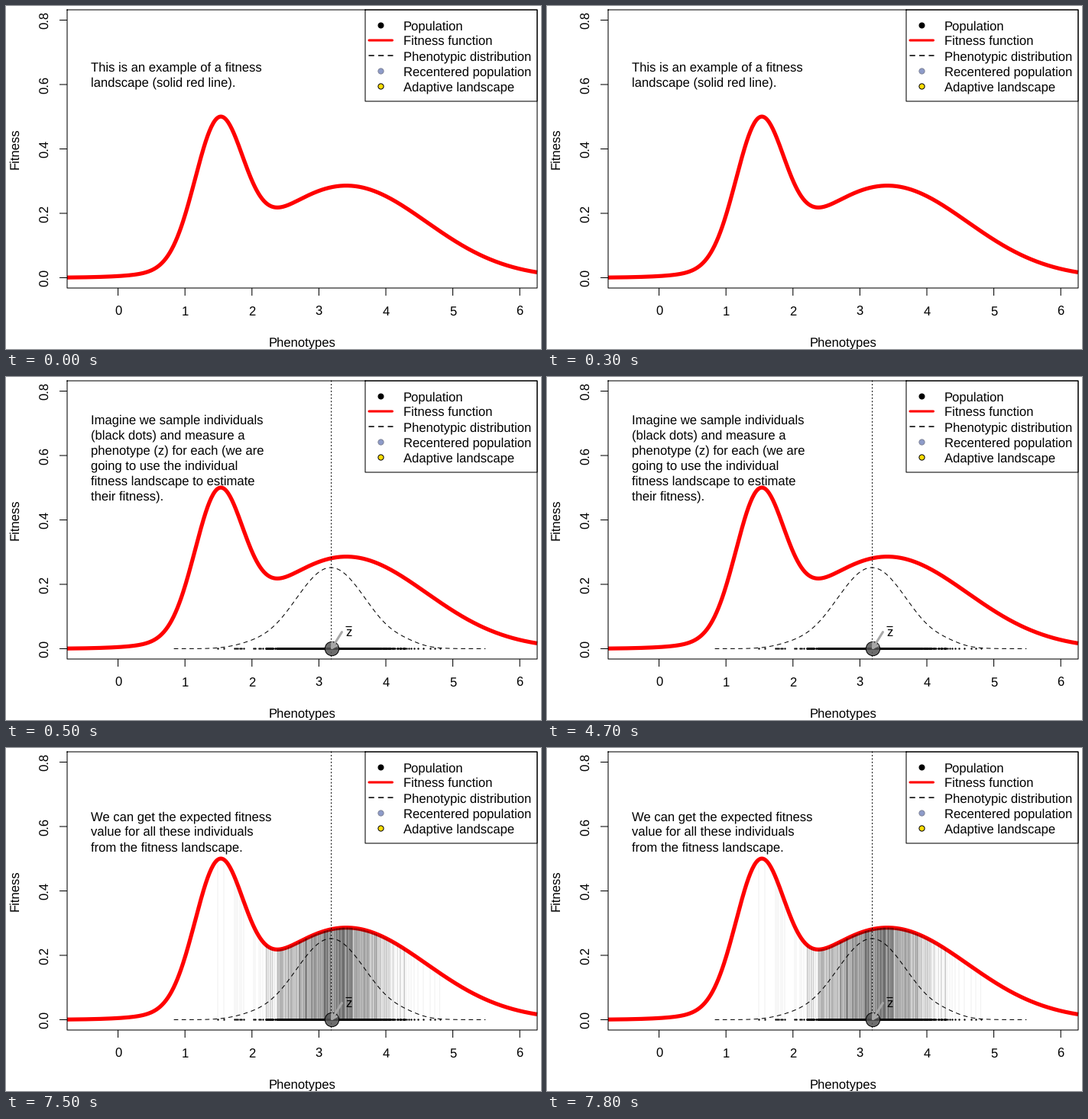
Animation, 700 px wide and 450 px high, one loop 8000 ms. Source, as a matplotlib script:

```python
import numpy as np
import matplotlib.pyplot as plt
from matplotlib.animation import FuncAnimation

W, H, DPI = 700, 450, 100
PX = 72 / DPI  # points per pixel
FRAMES, INTERVAL = 16, 500
LEFT, RIGHT, TOP, BOTTOM = 80, 695, 5, 370
XU, YU = (RIGHT - LEFT) / 7.02, (BOTTOM - TOP) / 0.864  # pixels per unit
X0, Y0 = LEFT + 0.76 * XU, BOTTOM - 0.032 * YU          # pixel of the origin
MEAN = 425.6

plt.rcParams.update({
    "font.family": "Liberation Sans",
    "font.size": 12,
    "text.hinting": "none",
    "path.snap": False,
    "toolbar": "None",
})

fig = plt.figure(figsize=(W / DPI, H / DPI), dpi=DPI, facecolor="white")
ax = fig.add_axes([0, 0, 1, 1])
ax.set_xlim(0, W)
ax.set_ylim(H, 0)
ax.axis("off")


def bell(x, mean, sd):
    return np.exp(-((x - mean) ** 2) / (2 * sd ** 2))


def fitness_y(px):
    z = (px - X0) / XU
    return Y0 - YU * (0.4185 * bell(z, 1.502, 0.358) + 0.286 * bell(z, 3.41, 1.196))


def line(xs, ys, width=1.04, color="black", z=3, dash=None, cap="butt"):
    art, = ax.plot(xs, ys, color=color, lw=width * PX, zorder=z,
                   solid_capstyle=cap, dash_capstyle="round",
                   solid_joinstyle="round")
    if dash:
        art.set_linestyle((0, tuple(d / width for d in dash)))
    return art


def frame(x0, y0, x1, y1):
    line([x0, x1, x1, x0, x0], [y0, y0, y1, y1, y0], z=5, cap="projecting")


def dot(x, y, r, face, edge="black", z=6):
    art, = ax.plot([x], [y], "o", ms=2 * r * PX, mfc=face, mec=edge,
                   mew=PX, zorder=z)
    return art


def label(x, y, s, ha="left", rot=0, z=7):
    return ax.text(x, y, s, ha=ha, va="baseline", rotation=rot,
                   rotation_mode="anchor", zorder=z)


def paragraph(baseline, text):
    return [label(111, baseline + 20 * i, row)
            for i, row in enumerate(text.split("\n"))]


def draw_axes():
    frame(LEFT, TOP, RIGHT, BOTTOM)
    for i in range(7):
        x = X0 + XU * i
        line([x, x], [BOTTOM, BOTTOM + 10])
        label(x, 406, str(i), "center")
    for i in range(5):
        y = Y0 - YU * 0.2 * i
        line([LEFT - 10, LEFT], [y, y])
        label(56, y, f"{0.2 * i:.1f}", "center", 90)
    label((LEFT + RIGHT) / 2, 446, "Phenotypes", "center")
    label(16, (TOP + BOTTOM) / 2, "Fitness", "center", 90)


def draw_legend():
    frame(470, TOP, RIGHT, 125)
    names = ("Population", "Fitness function", "Phenotypic distribution",
             "Recentered population", "Adaptive landscape")
    for i, name in enumerate(names):
        label(519.8, 31 + 20 * i, name)
    dot(490, 25, 3.5, "black")
    line([475, 505.5], [45, 45], 3.1, "red", cap="round")
    line([475, 506], [65, 65], 1.56, dash=(6.25, 6.25))
    dot(490, 85, 3.6, "#8d9bc9", "#7f8499")
    dot(490, 105, 3.6, "#ffdd00")


def sample_population():
    rng = np.random.default_rng(11)
    core = rng.normal(MEAN, 44.5, 1000)
    core = core[(core > 338) & (core < 522)]
    tails = [277, 285, 299, 301, 303, 306, 308, 311, 324, 326, 331, 333, 336,
             524, 527, 530, 534, 539, 546, 555, 561, 567.5]
    return np.concatenate([core, tails])


def draw_sample(pop):
    xs = np.linspace(220, 627, 300)
    ys = (Y0 - 106.5 * bell(xs, 425, 46)
          - 3 * bell(xs, 318, 22) - 3.5 * bell(xs, 524, 18))
    points, = ax.plot(pop, np.full(pop.size, Y0), "o", color="black",
                      ms=2.4 * PX, mew=0, zorder=4)
    grey = "#a8a8a8"
    tip, tail = np.array([426.5, 355.5]), np.array([439.5, 334.5])
    angle = np.arctan2(*(tail - tip)[::-1])
    head = [tip + 7 * np.array([np.cos(angle + s), np.sin(angle + s)])
            for s in (-0.52, 0.52)]
    return [
        line(xs, ys, dash=(5, 5.2)),
        line([MEAN, MEAN], [TOP, BOTTOM], 1.1, dash=(1.05, 3.4)),
        points,
        dot(MEAN, Y0, 9.2, (0.33, 0.33, 0.33, 0.85)),
        line([tail[0], tip[0]], [tail[1], tip[1]], 3, grey, 7, cap="round"),
        line([head[0][0], tip[0], head[1][0]],
             [head[0][1], tip[1], head[1][1]], 3, grey, 7, cap="round"),
        label(448.5, 339.5, "z", "center"),
        line([444.5, 452.5], [327.5, 327.5], 1.2, z=7),
    ]


draw_axes()
draw_legend()
curve_x = np.linspace(LEFT, RIGHT, 500)
line(curve_x, fitness_y(curve_x), 5.2, "red", z=1)

population = sample_population()
sample = draw_sample(population)
stems = ax.vlines(population, Y0, fitness_y(population), color="black",
                  alpha=0.06, lw=1.04 * PX, zorder=2)

intro = paragraph(85.3, "This is an example of a fitness\n"
                        "landscape (solid red line).")
sampling = paragraph(61.3, "Imagine we sample individuals\n"
                           "(black dots) and measure a\n"
                           "phenotype (z) for each (we are\n"
                           "going to use the individual\n"
                           "fitness landscape to estimate\n"
                           "their fitness).")
expected = paragraph(95.3, "We can get the expected fitness\n"
                           "value for all these individuals\n"
                           "from the fitness landscape.")


def show(artists, on):
    for art in artists:
        art.set_visible(on)


def update(i):
    stage = 0 if i == 0 else 1 if i < FRAMES - 1 else 2
    show(intro, stage == 0)
    show(sampling, stage == 1)
    show(expected + [stems], stage == 2)
    show(sample, stage > 0)
    return []


anim = FuncAnimation(fig, update, frames=FRAMES, interval=INTERVAL,
                     init_func=lambda: update(0), repeat=True,
                     repeat_delay=0, blit=False)
plt.show()
```
